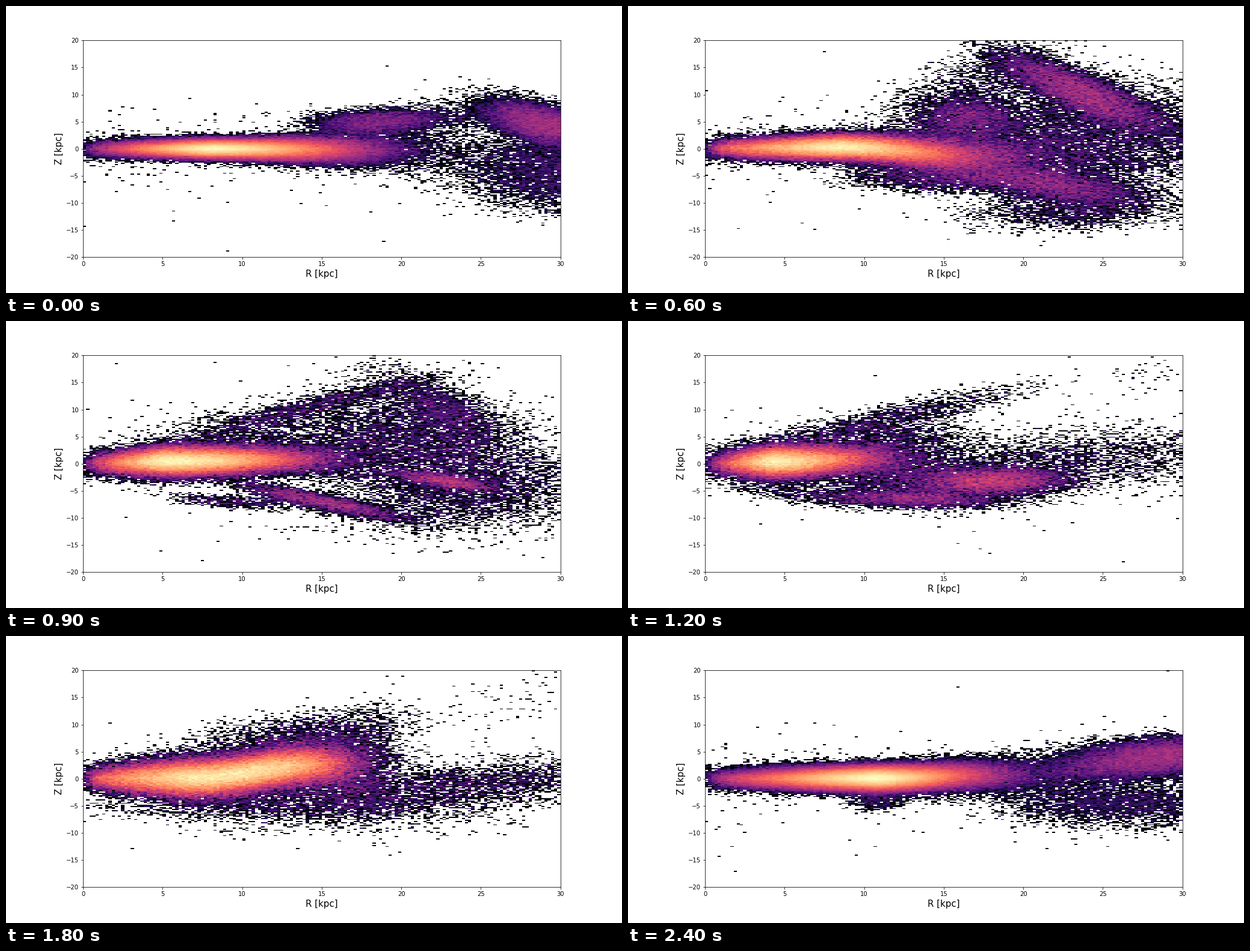
A matplotlib script for the animation above (2550 ms loop, 1024 by 478 pixels).

```python
import numpy as np
import matplotlib.pyplot as plt
from matplotlib.animation import FuncAnimation
from matplotlib.colors import LogNorm

W, H, DPI = 1024, 478, 72
FRAMES, STEP = 17, 150
NR, NZ = 150, 200
FADE = 300  # ms for a cloud to appear or vanish

r_edges = np.linspace(0, 30, NR + 1)
z_edges = np.linspace(-20, 20, NZ + 1)
r = (r_edges[1:] + r_edges[:-1]) / 2
z = ((z_edges[1:] + z_edges[:-1]) / 2)[:, None]


class Track:
    """Key poses (time first) joined by straight motion."""

    def __init__(self, *keys):
        self.times, *self.columns = np.array(keys, float).T

    def at(self, t):
        return [np.interp(t, self.times, c) for c in self.columns]

    def gap(self, t):
        return max(self.times[0] - t, t - self.times[-1], 0)


# time, log10 of the peak count, radius of the core and of the rim,
# steepness towards the rim, inner level, core height and half thickness,
# tail height and half thickness
disc = Track(
    (0, 2.85, 8, 22.7, 1.6, .42, 0, 3.0, -.2, 4.2),
    (300, 2.7, 9, 20.3, 5, .60, 0, 3.7, -.3, 5.2),
    (600, 2.3, 8.5, 23, 1.4, .60, .3, 3.8, -1.5, 5.2),
    (900, 2.2, 5.2, 18, 2, .50, .5, 4.4, .8, 3.6),
    (1200, 2.1, 4.3, 14, 1.7, .45, .4, 4.7, 1.0, 3.9),
    (1800, 2.0, 7, 18.6, 4, .65, .2, 5.6, 2.6, 5.7),
    (2400, 2.85, 10.8, 23, 1.3, .45, .1, 4.0, .7, 4.2))

# time, R, Z, half length, half thickness, slope, level
clouds = [
    # outer crest: rises, then sweeps over and thins out
    Track((0, 18.5, 5, 5.2, 3, .1, .38), (300, 19.5, 8.6, 5, 3.9, -.05, .5),
          (600, 23.6, 10.5, 6.8, 5, -1.15, .45), (900, 22.5, 10.5, 4, 4.2, -1.3, .18)),
    # arch between the disc and the crest
    Track((600, 16.5, 10.5, 4.5, 5, 1.2, .03), (900, 14.5, 10.7, 6.8, 1.8, .7, .17),
          (1200, 11.5, 8.3, 7, 2.2, .62, .1), (1800, 13.5, 8.5, 5.5, 2.8, .3, .08)),
    # far lobe: falls in, crosses the plane and moves out again
    Track((0, 29, 4.5, 5.3, 5.2, -.7, .45), (300, 28.2, -3, 5, 8.3, -.3, .45),
          (600, 21.5, -6.5, 6.8, 3.4, -.35, .38), (900, 22.8, -3.2, 4.2, 1.6, -.45, .48),
          (1200, 18.2, -3.2, 5.8, 3.4, .05, .52), (1800, 21.5, -2, 6.5, 2.8, .25, .04),
          (2400, 28.5, 4, 9, 4.8, .3, .45)),
    # stream below the disc
    Track((600, 14, -5.5, 5.5, 2.7, -.15, .25), (900, 15, -7, 6.5, 2, -.6, .45),
          (1200, 13, -6.5, 6.5, 1.9, -.1, .4), (1800, 11, -5, 7, 2, 0, .03),
          (2400, 10.8, -4, 1.8, 2, 0, .15)),
    Track((900, 9.5, -7, 4, 1.2, -.15, .2), (1200, 6, -5.5, 4, 1.3, -.35, .05)),
    # inner puff above the disc
    Track((600, 16.5, 5.5, 3.8, 4.4, 0, .34), (900, 11, 5, 5, 4, .2, .05),
          (1200, 11.5, 4, 4, 4, .1, .08), (1800, 17.3, 3, 2.7, 7, 0, .1)),
    # thin field on the right
    Track((0, 23, 6, 3.5, 2.5, 0, .05), (300, 25, 6, 6.5, 8, .2, .05),
          (600, 24, 1.5, 8, 10, 0, .14), (900, 21.5, 3, 6.5, 10, -.4, .16),
          (1200, 22, .3, 9, 4, .2, .02), (1800, 28, 0, 4, 2.8, .2, -.02)),
    # thin field below
    Track((0, 29, -4.5, 6, 7.5, -.3, .18), (300, 25.5, -11, 4.8, 4, -.2, .15),
          (600, 23.5, -11, 6, 3.5, .1, .15), (900, 25, -6, 7, 5, .2, .02),
          (1200, 13, -3.5, 6, 4, 0, .15), (1800, 18, -4.5, 7, 3.5, .1, -.06),
          (2400, 26, -4.5, 8, 4.5, -.05, .15)),
    # stragglers in the upper right corner
    Track((1200, 28.5, 16, 2.5, 3, 0, -.55), (1800, 28, 15.5, 3, 3.5, 0, -.55)),
]


def fall(level, dist, power):
    """Log brightness at a scaled distance; the visible edge is near 1."""
    return level - (np.maximum(level, 0) + .15) * dist ** power


def disc_level(core, rim, steep, inner, z_core, h_core, z_tail, h_tail):
    left = 1 - (1 - inner) * np.clip(1 - r / core, 0, 1) ** 1.3
    right = np.clip((r - core) / (rim - core), 0, None) ** steep
    level = (left - right) * (1 - .9 * np.exp(-r / .4))
    ease = np.clip((r - core) / (.8 * rim - core), 0, 1)
    ease = ease ** 2 * (3 - 2 * ease)
    inside = np.minimum(r / core, 1)
    mid = z_core * inside + (z_tail - z_core) * ease
    half = 1.9 + (h_core - 1.9) * np.sqrt(inside) + (h_tail - h_core) * ease
    return fall(level, np.abs(z - mid) / half, 1.7)


def cloud_level(r0, z0, length, thick, slope, level):
    dr = r - r0
    dist = np.hypot(dr / length, (z - z0 - slope * dr) / thick)
    return fall(level, dist, 2.4)


def density(t):
    log_peak, *shape = disc.at(t)
    levels = [disc_level(*shape)]
    for cloud in clouds:
        levels.append(cloud_level(*cloud.at(t)) - 1.2 * cloud.gap(t) / FADE)
    halo = .0005 + .18 * np.exp(-np.abs(z) / 2.4)
    return halo + sum(10 ** (log_peak * np.maximum(l, -4)) for l in levels)


def counts(i):
    stars = np.random.default_rng(40 + i).poisson(density(i * STEP))
    return np.ma.masked_equal(stars, 0)


fig, ax = plt.subplots(figsize=(W / DPI, H / DPI), dpi=DPI)
fig.subplots_adjust(left=.125, right=.9, bottom=.125, top=.88)
mesh = ax.pcolormesh(r_edges, z_edges, counts(0), cmap="magma",
                     norm=LogNorm(1, 700))
ax.set_xlim(0, 30)
ax.set_ylim(-20, 20)
ax.set_xlabel("R [kpc]", fontsize=15)
ax.set_ylabel("Z [kpc]", fontsize=15)


def draw(i):
    grid = counts(i)
    mesh.set_array(grid)
    mesh.set_clim(1, grid.max())
    return [mesh]


anim = FuncAnimation(fig, draw, frames=FRAMES, interval=STEP, repeat=True,
                     repeat_delay=0)
plt.show()
```
